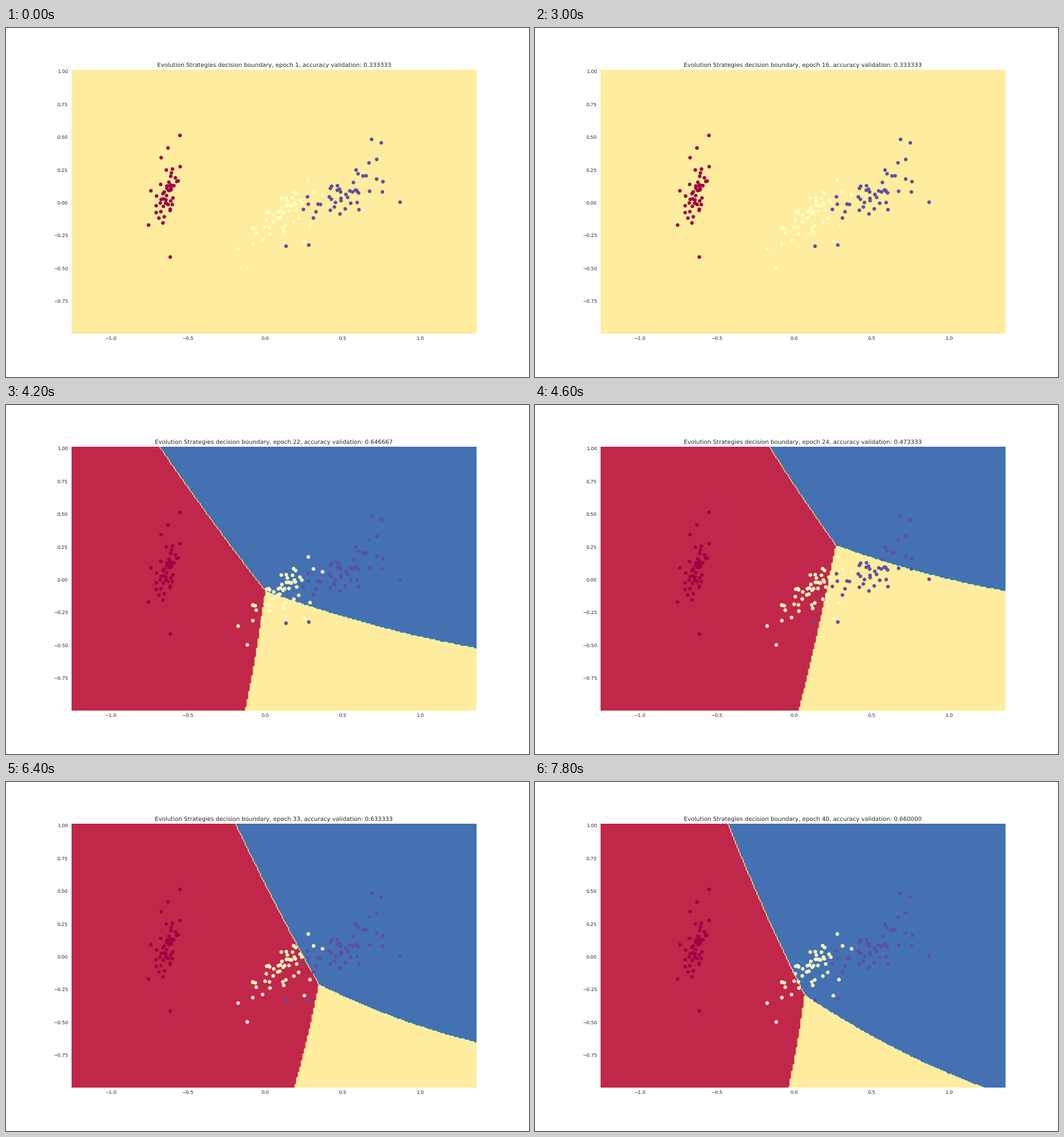
These frames come from a looping animation (917x611 px, 8 s). A matplotlib script:

```python
import numpy as np
import matplotlib.pyplot as plt
from matplotlib.animation import FuncAnimation

W, H, DPI = 917, 611, 61.125
FRAMES, STEP_MS = 40, 200
INK = "#262626"

# Pixel position of the data origin and pixels per data unit
X0, Y0, SX, SY = 454.5, 306.8, 271.26, 229.5
TOP, BOTTOM, RIGHT = 73, 535, 825

# The whole plane is one class up to this epoch
LAST_FLAT = 16

# epoch: (top x, left bow, junction x, junction y, bottom x, right y, hits of 150)
POSES = {
    19: (898, -28, 631, 536, 631, 540, 50),
    22: (270, -3, 455, 325, 420, 425, 97),
    24: (412, -2, 528, 245, 463, 325, 71),
    28: (326, -3, 478, 322, 436, 447, 101),
    33: (403, -3, 549, 354, 506, 455, 95),
    40: (339, -4, 473, 372, 445, 547, 99),
}

plt.rcParams.update({"font.family": "DejaVu Sans", "text.color": INK,
                     "xtick.color": INK, "ytick.color": INK,
                     "text.hinting": "no_hinting"})


def cloud(rng, center, spread, slope, extremes, n=50):
    """Slanted Gaussian cluster plus its few outermost points, in pixels."""
    count = n - len(extremes)
    dx, dy = np.clip(rng.normal(size=(2, count)), -1.9, 1.9)
    x = dx * spread[0]
    y = slope * x + dy * spread[1]
    return np.vstack([np.column_stack([x, y]) + center, extremes])


def bow(a, b, t, sag):
    """Parabola from a to b that leaves the straight line by sag at its middle."""
    return a + (b - a) * t + 4 * sag * t * (1 - t)


def classify(epoch):
    """Predicted class on the grid and the number of correct answers."""
    if epoch <= LAST_FLAT:
        return np.ones_like(gx), 50
    top, left_bow, jx, jy, low, end, hits = (
        np.interp(epoch, list(POSES), col) for col in zip(*POSES.values()))
    upper = bow(top, jx, (gy - TOP) / (jy - TOP), left_bow)
    lower = bow(jx, low, (gy - jy) / (BOTTOM - jy), 2)
    edge = np.where(gy < jy, upper, lower)
    floor = bow(jy, end, (gx - jx) / (RIGHT - jx), 0.085 * (end - jy))
    z = np.where(gx < edge, 0, np.where(gy < floor, 2, 1))
    return z, round(float(hits))


fig = plt.figure(figsize=((W + 0.01) / DPI, (H + 0.01) / DPI), dpi=DPI,
                 facecolor="white")
ax = fig.add_axes([0.125, 0.125, 0.775, 0.755])
xs = np.linspace(-1.253, 1.367, 263)
ys = np.linspace(-0.9926, 1.0174, 202)
gx, gy = np.meshgrid(X0 + xs * SX, Y0 - ys * SY)

rng = np.random.default_rng(7)
dots = np.vstack([
    cloud(rng, (288, 286), (13, 23), -0.9,
          [(305, 188), (284, 210), (272, 227), (254, 285), (250, 345), (288, 401)]),
    cloud(rng, (486, 327), (28, 18), -0.7,
          [(407, 387), (423, 420), (523, 374), (533, 346), (530, 266), (555, 292)]),
    cloud(rng, (586, 300), (34, 19), -0.55,
          [(641, 195), (658, 201), (650, 230), (661, 269), (660, 287), (691, 305),
           (491, 382), (531, 380)]),
])
ax.scatter((dots[:, 0] - X0) / SX, (Y0 - dots[:, 1]) / SY,
           c=np.repeat([0, 1, 2], 50), cmap="Spectral",
           s=36, linewidths=1.5, zorder=3)

ax.set_xlim(xs[0], xs[-1])
ax.set_ylim(ys[0], ys[-1])
ax.set_autoscale_on(False)
ax.set_xticks(np.arange(-1, 1.1, 0.5))
ax.set_yticks(np.arange(-0.75, 1.1, 0.25))
ax.tick_params(length=0, pad=7, labelsize=10)
ax.spines[:].set_visible(False)
title = ax.set_title("", fontsize=12, pad=6)
drawn = {}


def draw(i):
    epoch = i + 1
    z, hits = classify(epoch)
    if "map" in drawn:
        drawn["map"].remove()
    # Fewer colour bands when the middle class is absent
    levels = np.linspace(0, 2, 9) if (z == 1).any() else np.linspace(0, 2.1, 8)
    drawn["map"] = ax.contourf(xs, ys, z, levels=levels, cmap="Spectral", zorder=1)
    title.set_text(f"Evolution Strategies decision boundary, epoch {epoch}, "
                   f"accuracy validation: {hits / 150:.6f}")
    return [title]


anim = FuncAnimation(fig, draw, frames=FRAMES, interval=STEP_MS,
                     repeat=True, repeat_delay=0, blit=False)
plt.show()
```
